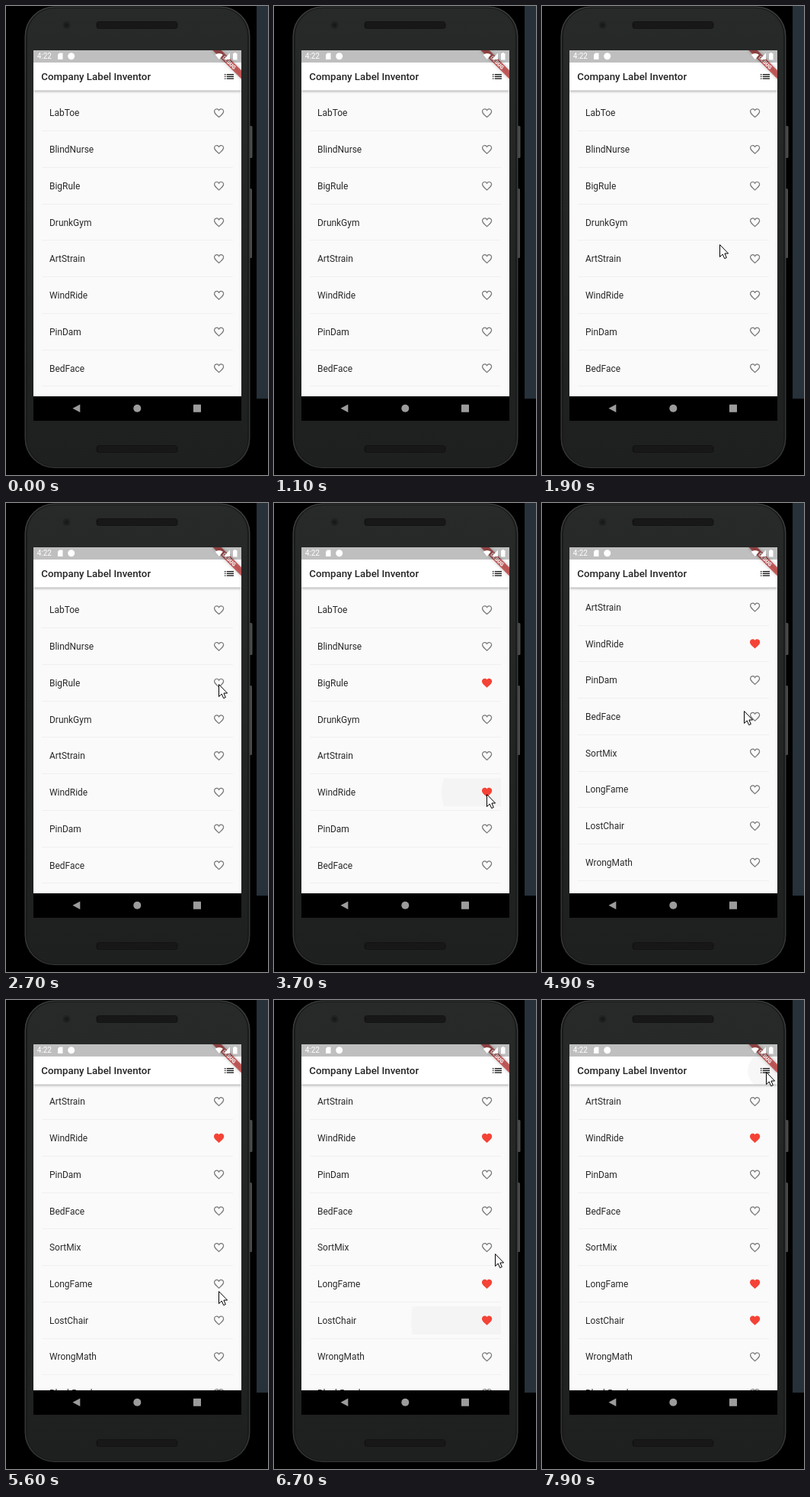
An HTML page with a canvas that plays this animation: 344x614 px, repeating every 8 s.

```html
<!DOCTYPE html>
<html lang="en">
<head>
<meta charset="utf-8">
<title>Name list</title>
<style>
html, body { margin: 0; width: 100%; height: 100%; overflow: hidden; background: #000; }
canvas { display: block; width: 344px; height: 614px; }
</style>
</head>
<body>
<canvas id="stage" width="344" height="614"></canvas>
<script>
const c = document.getElementById('stage').getContext('2d');
const LOOP = 8000, STEP = 100, TRAVEL = 500;
const ROW = 47.73, FIRST = 140.2, DP = 273 / 411.43;
const heart = new Path2D('M12 21.3C5 15 2 12.5 2 8.5 2 3 9 1 12 5.1 15 1 22 3 22 8.5 22 12.5 19 15 12 21.3Z');
const arrow = new Path2D('M.5.5V16.5L4.2 13 6.7 18.6 9.3 17.5 6.9 12H11.6Z');

const rows = ['LabToe', 'BlindNurse', 'BigRule', 'DrunkGym', 'ArtStrain', 'WindRide', 'PinDam',
  'BedFace', 'SortMix', 'LongFame', 'LostChair', 'WrongMath', 'BlackBand'];
const liked = { BigRule: 3100, WindRide: 3700, LongFame: 5800, LostChair: 6600 };

// Arrival time, x, y; the pointer rests at each stop until it must leave.
const stops = [[500, 345, 167], [600, 337, 167], [900, 345, 140], [1100, 345, 400],
  [1300, 292, 394], [1900, 233, 312], [2400, 277, 229], [2700, 279, 237], [2900, 283, 273],
  [3600, 279, 381], [4400, 239, 315], [4900, 265, 272], [5600, 279, 381], [6400, 280, 418],
  [6700, 290, 332], [7200, 294, 105], [7500, 294, 94]];

function pointerAt(t) {
  const i = stops.findIndex(s => t <= s[0]);
  if (i < 1) return stops.at(i).slice(1);
  const [t0, x0, y0] = stops[i - 1], [t1, x1, y1] = stops[i];
  const from = Math.max(t0, t1 - TRAVEL);
  const u = Math.max(0, (t - from) / (t1 - from)), k = u * u * (3 - 2 * u);
  return [x0 + (x1 - x0) * k, y0 + (y1 - y0) * k];
}

// A fling: quick pick-up, then a long settle.
const scrollAt = t => 198 * (1 - Math.exp(-Math.pow(Math.max(0, t - 4300) / 338, 2.43)));

function box(x, y, w, h, color, r = 0) {
  c.fillStyle = color;
  c.beginPath();
  c.roundRect(x, y, w, h, r);
  c.fill();
}

function disc(x, y, r, color) {
  c.fillStyle = color;
  c.beginPath();
  c.arc(x, y, r, 0, 7);
  c.fill();
}

function poly(color, ...pts) {
  c.fillStyle = color;
  c.beginPath();
  for (let i = 0; i < pts.length; i += 2) c.lineTo(pts[i], pts[i + 1]);
  c.fill();
}

function label(text, x, y, size, color, weight = 400) {
  c.font = `${weight} ${size}px Roboto, sans-serif`;
  c.fillStyle = color;
  c.fillText(text, x, y);
}

function clipped(x, y, w, h, paint) {
  c.save();
  c.beginPath();
  c.rect(x, y, w, h);
  c.clip();
  paint();
  c.restore();
}

function fade(top, bottom) {
  const g = c.createLinearGradient(0, 0, 0, 605);
  g.addColorStop(0, top);
  g.addColorStop(1, bottom);
  return g;
}

function speaker(y) {
  box(118.5, y, 107, 10, '#131313', 4);
  c.fillStyle = '#262626';
  for (let j = 0; j < 4; j++)
    for (let x = 121 + j % 2; x < 224; x += 2) c.fillRect(x, y + 1.5 + j * 2, 1, 1);
}

function phone() {
  box(0, 0, 344, 614, '#000');
  box(329, 0, 15, 514, '#263139');
  box(318, 157, 5.5, 42, '#4b4b4b', 1.5);
  box(318, 239, 5, 91, '#4b4b4b', 1.5);
  box(24.5, 0.5, 296, 604.5, fade('#3b3c3c', '#343535'), 39);
  box(26, 1.8, 293, 602, '#191a1a', 38);
  box(28, 3, 289, 599.5, fade('#282929', '#1e1f1f'), 36);
  speaker(20);
  speaker(575);
  disc(79.5, 25, 5, '#202121');
  disc(79.5, 25, 2.5, '#181919');
}

function drawHeart(y, on) {
  c.save();
  c.translate(279.6 - 12 * DP, y - 12 * DP);
  c.scale(DP, DP);
  if (on) {
    c.fillStyle = '#f44336';
    c.fill(heart);
  } else {
    c.clip(heart);
    c.strokeStyle = '#7c7c7c';
    c.lineWidth = 3.8;
    c.stroke(heart);
  }
  c.restore();
}

function ripple(y, age) {
  if (age < -100 || age > 500) return;
  const alpha = 0.024 * Math.min(1, 1.25 - age / 400);
  clipped(46, y - 18.5, 252, 37, () => disc(280, y, 60 + age * 0.4, `rgba(0,0,0,${alpha})`));
}

function list(t) {
  const scroll = scrollAt(t);
  rows.forEach((name, i) => {
    const y = FIRST + i * ROW - scroll;
    ripple(y, t - liked[name]);
    box(47, Math.round(y + 23), 251, 1, '#f0f0f0');
    label(name, 57, y + 4.2, 18 * DP, '#292929');
    drawHeart(y, t >= liked[name]);
  });
}

function appBar(t) {
  clipped(36, 58, 273, 60, () => {
    c.shadowColor = 'rgba(0,0,0,.3)';
    c.shadowBlur = 3;
    c.shadowOffsetY = 1;
    box(36, 58, 273, 52.5, '#fff');
  });
  if (t >= 7700) clipped(36, 74, 273, 36.5, () =>
    disc(293, 92.5, Math.min(23, 15 + (t - 7700) / 20), 'rgba(0,0,0,.03)'));
  label('Company Label Inventor', 46.3, 97.3, 20 * DP, '#242424', 500);
  for (let i = 0; i < 3; i++) {
    const y = 92.4 + (i * 4 - 5) * DP;
    box(287, y, 2 * DP, 2 * DP, '#111');
    box(289.7, y, 14 * DP, 2 * DP, '#111');
  }
}

function banner() {
  clipped(36, 58, 273, 60, () => {
    c.translate(309, 58);
    c.rotate(Math.PI / 4);
    c.shadowColor = 'rgba(0,0,0,.4)';
    c.shadowBlur = 4;
    box(-40 * DP, 28 * DP, 80 * DP, 12 * DP, 'rgba(183,28,28,.65)');
    c.shadowColor = 'transparent';
    c.textAlign = 'center';
    label('DEBUG', 0, 34 * DP + 2.4, 10.2 * DP, '#fff', 900);
  });
}

function statusBar() {
  box(36, 58, 273, 16, 'rgba(0,0,0,.25)');
  label('4:22', 40.7, 69.4, 10, '#fff');
  poly('#fff', 70, 61.5, 74.5, 61.5, 74.5, 70, 68, 70, 68, 63.5);
  disc(85.7, 65.8, 4.5, '#fff');
  c.fillStyle = '#fff';
  c.beginPath();
  c.moveTo(279.8, 70);
  c.arc(279.8, 70, 8, -Math.PI * 0.72, -Math.PI * 0.28);
  c.fill();
  poly('#fff', 294, 61.5, 294, 70, 286, 70);
  box(298, 62, 5.5, 8.5, '#fff', 0.6);
  box(299.6, 61, 2.3, 2, '#fff');
}

function navBar() {
  box(36, 511, 273, 32, '#000');
  poly('#9c9c9c', 87.5, 526.8, 97.3, 521.5, 97.3, 532.1);
  disc(172.3, 526.8, 5, '#9c9c9c');
  box(246, 521.8, 10, 10, '#9c9c9c', 0.5);
}

function pointer(t) {
  const [x, y] = pointerAt(t);
  c.save();
  c.translate(Math.round(x), Math.round(y));
  c.fillStyle = '#fff';
  c.fill(arrow);
  c.strokeStyle = '#000';
  c.lineWidth = 1;
  c.stroke(arrow);
  c.restore();
}

function draw(t) {
  phone();
  box(36, 58, 273, 485, '#fafafa');
  clipped(36, 110, 273, 401, () => list(t));
  appBar(t);
  banner();
  statusBar();
  navBar();
  pointer(t);
}

const start = performance.now();
function tick() {
  const ms = Math.max(0, performance.now() - start) % LOOP;
  draw(Math.floor(ms / STEP) * STEP);
  requestAnimationFrame(tick);
}
tick();
</script>
</body>
</html>
```
